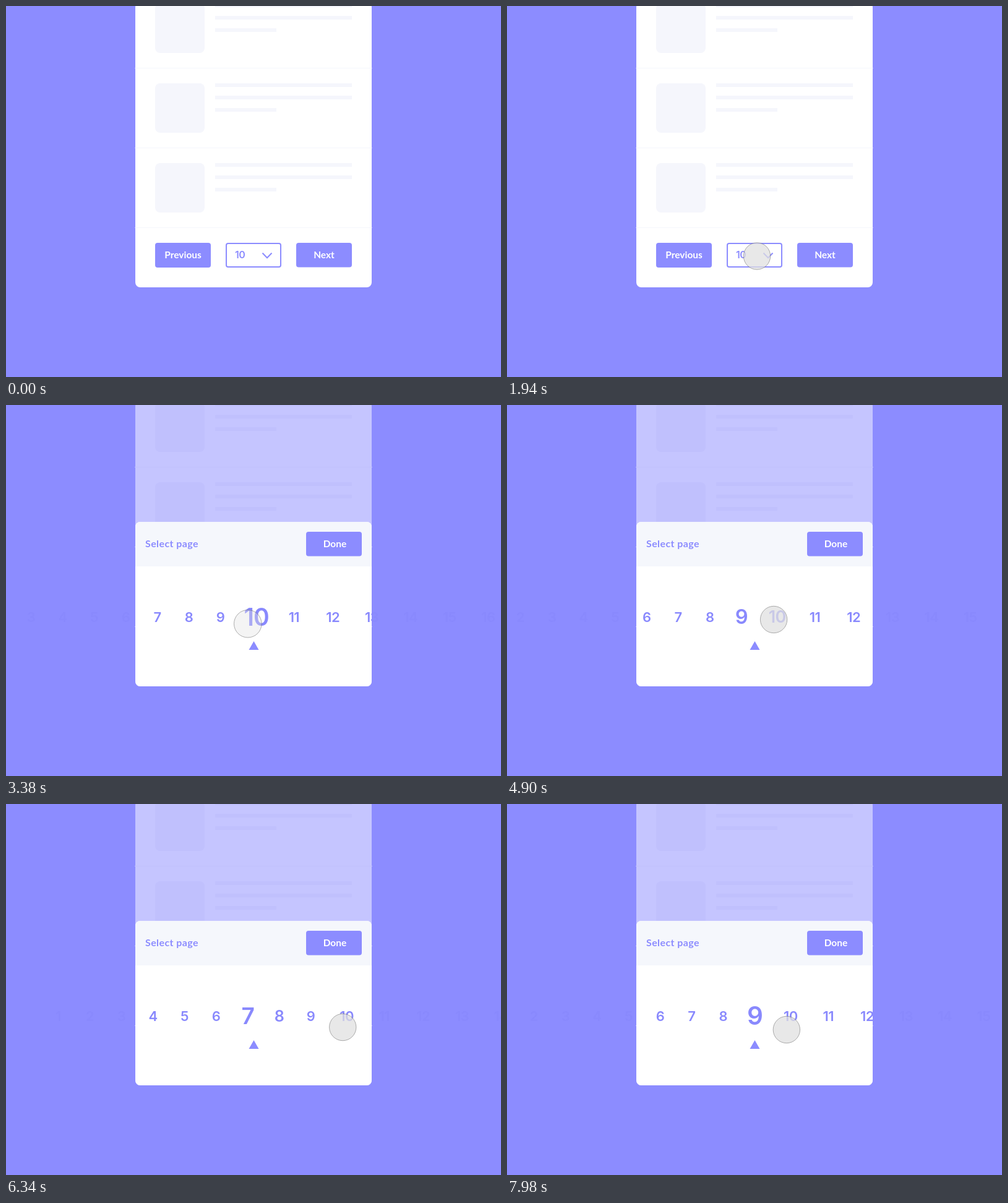
These frames come from a looping animation (800x600 px, 8 s). An HTML page:

```html
<!DOCTYPE html>
<html lang="en">
<head>
<meta charset="utf-8">
<title>Page picker</title>
<style>
  html, body { margin: 0; width: 100%; height: 100%; overflow: hidden; background: #8c8cff; }
  svg { display: block; width: 100vw; height: 100vh; }
  text { font: 700 15.5px Lato, "Open Sans", sans-serif; }
  .num { font: 600 22px Inter, "Open Sans", sans-serif; letter-spacing: -.03em; }
  .mid { text-anchor: middle; }
</style>
</head>
<body>
<svg viewBox="0 0 800 600">
  <rect width="800" height="600" fill="#8c8cff"/>
  <rect x="209" y="-6" width="382" height="461" rx="8" fill="#fff"/>
  <g id="rows" fill="#f5f6fc"></g>

  <g fill="#8c8cff">
    <rect x="241" y="383" width="90" height="40" rx="4"/>
    <rect x="469" y="383" width="90" height="39.5" rx="4"/>
    <text class="num" x="370" y="408" style="font-size:16px">10</text>
  </g>
  <g fill="none" stroke="#8c8cff" stroke-width="2">
    <rect x="356" y="384" width="88" height="38" rx="3"/>
    <path d="M414.5 399.5 422 407.3 429.5 399.5"/>
  </g>
  <g fill="#fff" class="mid">
    <text x="286" y="408">Previous</text>
    <text x="514" y="408">Next</text>
  </g>

  <g id="sheet" opacity="0">
    <path d="M209 0H591V447a8 8 0 0 1-8 8H217a8 8 0 0 1-8-8Z" fill="#8c8cff" opacity=".5"/>
    <rect x="209" y="189" width="382" height="266" rx="8" fill="#fff"/>
    <path d="M209 261V197a8 8 0 0 1 8-8H583a8 8 0 0 1 8 8V261Z" fill="#f5f7fc"/>
    <text x="225" y="230" fill="#8c8cff" style="font-size:16px;letter-spacing:.4px">Select page</text>
    <rect x="485" y="205" width="90" height="39.5" rx="4" fill="#8c8cff"/>
    <text class="mid" x="531.5" y="230" fill="#fff">Done</text>
    <path d="M392.5 396 400.5 382 408.5 396Z" fill="#8c8cff"/>
    <g id="numbers" class="mid" fill="#8989fd"></g>
  </g>

  <circle id="cursor" stroke="#6e6e6e" stroke-opacity=".55" stroke-width="1"/>
</svg>
<script>
const LOOP = 8000;
const $ = id => document.getElementById(id);

function add(parent, tag, attrs) {
  const el = document.createElementNS("http://www.w3.org/2000/svg", tag);
  for (const k in attrs) el.setAttribute(k, attrs[k]);
  return parent.appendChild(el);
}

// Placeholder list
for (const y of [-4, 125, 254]) {
  add($("rows"), "rect", { x: 241, y, width: 80, height: 80, rx: 8 });
  [221, 221, 99].forEach((width, i) =>
    add($("rows"), "rect", { x: 338, y: y + 20 * i, width, height: 6 }));
  add($("rows"), "rect", { x: 208.5, y: y + 104, width: 383, height: 1 });
}

// Page numbers, placed relative to 10
const numbers = [];
for (let n = 1; n <= 18; n++) {
  const k = n - 10;
  const rel = k < 0 ? 51 * k - 7 : k > 0 ? 62.8 * k - 2 : 0;
  const el = add($("numbers"), "text", { class: "num", y: 8 });
  el.textContent = n;
  numbers.push({ el, x: 404.5 + rel });
}

const clamp = v => Math.max(0, Math.min(1, v));
const span = (t, a, b) => clamp((t - a) / (b - a));
const ease = u => u * u * (3 - 2 * u);
const mix = (a, b, u) => a + (b - a) * u;

// Bezier curve of any degree
function bezier(points, u) {
  while (points.length > 1)
    points = points.slice(1).map((p, i) => [mix(points[i][0], p[0], u), mix(points[i][1], p[1], u)]);
  return points[0];
}

// Smooth monotone curve through [time, value] keys
function track(keys) {
  const slope = i => (keys[i + 1][1] - keys[i][1]) / (keys[i + 1][0] - keys[i][0]);
  const tangents = keys.map((_, i) => {
    if (i === 0 || i === keys.length - 1) return 0;
    const a = slope(i - 1), b = slope(i);
    return a * b > 0 ? 2 * a * b / (a + b) : 0;
  });
  return t => {
    if (t <= keys[0][0]) return keys[0][1];
    const i = keys.findIndex(k => k[0] > t) - 1;
    if (i < 0) return keys[keys.length - 1][1];
    const [t0, v0] = keys[i], [t1, v1] = keys[i + 1];
    const d = t1 - t0, u = (t - t0) / d, s = ease(u);
    return mix(v0, v1, s) + d * u * (1 - u) * (tangents[i] * (1 - u) - tangents[i + 1] * u);
  };
}

const scroll = track([[4520, 0], [4900, 32], [5500, 98], [6180, 138], [6340, 146],
  [6960, 160], [7380, 160], [7980, 54], [8200, 18]]);
const grip = track([[4520, 394], [4900, 399], [6960, 398]]);
const dragY = track([[4520, 346.5], [4900, 347], [5340, 354], [5500, 357],
  [6160, 361], [7380, 361], [7980, 365]]);

const moves = [
  [220, 840, [[745, -30], [700, 250], [500, 485], [428, 408]]],
  [1000, 1500, [[428, 408], [404, 404.5]]],
  [2980, 3620, [[404, 404.5], [398.5, 350.6], [381, 346]]],
  [4060, 4400, [[381, 346], [394, 346.5]]]
];

function cursorAt(t) {
  if (t >= 4520) return [grip(t) + scroll(t), dragY(t)];
  const [a, b, path] = moves.filter((m, i) => i === 0 || t >= m[0]).pop();
  return bezier(path, ease(span(t, a, b)));
}

function render(t) {
  $("sheet").setAttribute("opacity", span(t, 2100, 2460));

  const offset = scroll(t);
  for (const { el, x } of numbers) {
    const px = x + offset;
    const s = 1 + 0.85 * clamp(1 - Math.abs(px - 400) / 50);
    el.setAttribute("transform", `translate(${px} 342.6) scale(${s})`);
  }

  const pressed = (t >= 1940 && t < 2120) || t >= 4540;
  const [cx, cy] = cursorAt(t);
  const cursor = $("cursor");
  cursor.setAttribute("cx", cx);
  cursor.setAttribute("cy", cy);
  cursor.setAttribute("r", pressed ? 21.7 : 22.3);
  cursor.setAttribute("fill", `rgba(224,224,224,${pressed ? 0.74 : 0.36})`);
  cursor.setAttribute("visibility", t < 240 ? "hidden" : "visible");
}

const start = performance.now();
function frame() {
  render((performance.now() - start) % LOOP);
  requestAnimationFrame(frame);
}
frame();
</script>
</body>
</html>
```
